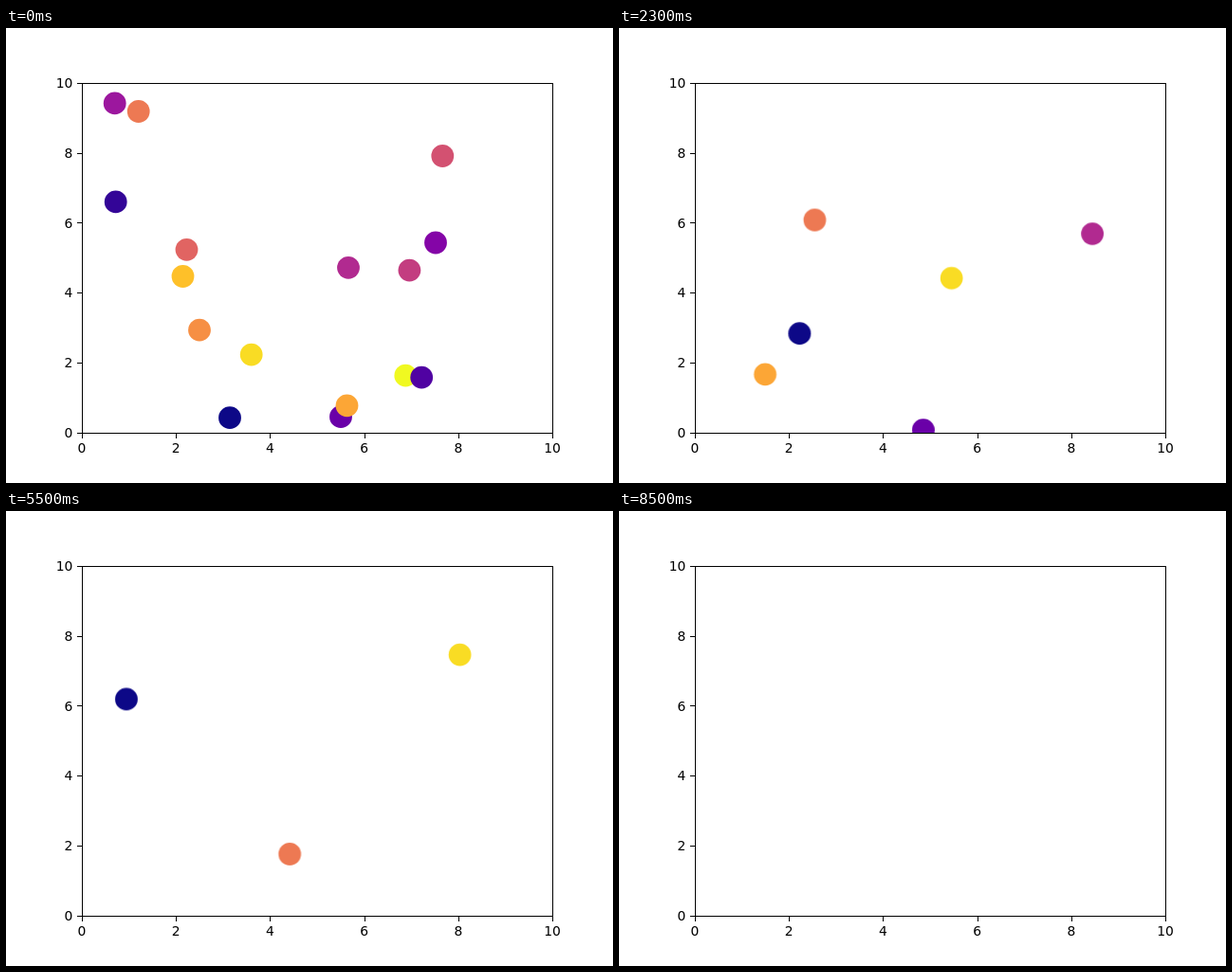
Write an HTML page that moves like this. It is 640 px wide and 480 px high and loops after 8.72 s.

```html
<!DOCTYPE html>
<html lang="en">
<head>
<meta charset="utf-8">
<title>Drifting scatter plot</title>
<style>
  html, body { margin: 0; width: 100%; height: 100%; overflow: hidden; background: #fff; }
  svg { display: block; width: 640px; height: 480px; }
  text { font: 13.89px "DejaVu Sans", sans-serif; }
  .frame { fill: none; stroke: #000; stroke-width: 1; }
  /* 85 moves of 100 ms, then a short hold before the loop restarts */
  circle { animation: drift 8720ms steps(85, end) infinite; }
  @keyframes drift {
    from { transform: translate(0, 0); }
    97.477%, to { transform: translate(var(--dx), var(--dy)); }
  }
</style>
</head>
<body>
<svg viewBox="0 0 640 480">
  <clipPath id="plot"><rect x="80" y="58" width="496.5" height="369.5"/></clipPath>
  <g id="balls" clip-path="url(#plot)"></g>
  <rect class="frame" x="80.5" y="58.5" width="496" height="369"/>
  <g id="axes"></g>
</svg>
<script>
  const MOVES = 85;

  // colour, start x, start y, x and y change per move; in drawing order
  const balls = [
    ['#f0f921', 421.3, 366.7, -5.84, 9.01],
    ['#6a00a8', 353, 410.2, -1.4, 0.603],
    ['#0d0887', 236, 411.2, -1.983, -3.866],
    ['#330597', 115.7, 183.4, -9.4, 0],
    ['#5002a2', 438.2, 368.6, -3.93, 4.96],
    ['#8405a7', 453, 226.5, 11.74, -5.74],
    ['#9c179e', 114.7, 79.4, -5, -6],
    ['#b12a90', 361, 252.8, 6.006, -1.556],
    ['#c33d80', 425.4, 255.6, 11.84, 5.27],
    ['#d35171', 460.3, 135, -1.71, -8.46],
    ['#e16462', 190.5, 233.8, -11.04, -3.43],
    ['#ed7953', 139.7, 88, 2.9, 4.98],
    ['#f68f44', 204, 318.7, -7.47, 4.23],
    ['#fca636', 359.5, 398.3, -8.93, -1.433],
    ['#fec029', 186.5, 262, -3.55, 8.9],
    ['#f9dc24', 258.7, 344.6, 3.997, -3.509]
  ];

  function add(parent, tag, attributes, content = '') {
    const node = document.createElementNS('http://www.w3.org/2000/svg', tag);
    for (const name in attributes) node.setAttribute(name, attributes[name]);
    node.textContent = content;
    return parent.appendChild(node);
  }

  const axes = document.getElementById('axes');
  for (let value = 0; value <= 10; value += 2) {
    const x = 80 + 49.6 * value;
    const y = 427.2 - 36.96 * value;
    add(axes, 'path', { class: 'frame', d: `M${Math.round(x) + 0.5} 428v5M75 ${Math.round(y) + 0.5}h5` });
    add(axes, 'text', { x, y: 448, 'text-anchor': 'middle' }, value);
    add(axes, 'text', { x: 70.3, y: Math.round(y + 5.1), 'text-anchor': 'end' }, value);
  }

  const group = document.getElementById('balls');
  for (const [fill, cx, cy, vx, vy] of balls) {
    const ball = add(group, 'circle', { cx, cy, r: 11.9, fill });
    ball.style.setProperty('--dx', `${vx * MOVES}px`);
    ball.style.setProperty('--dy', `${vy * MOVES}px`);
  }
</script>
</body>
</html>
```
